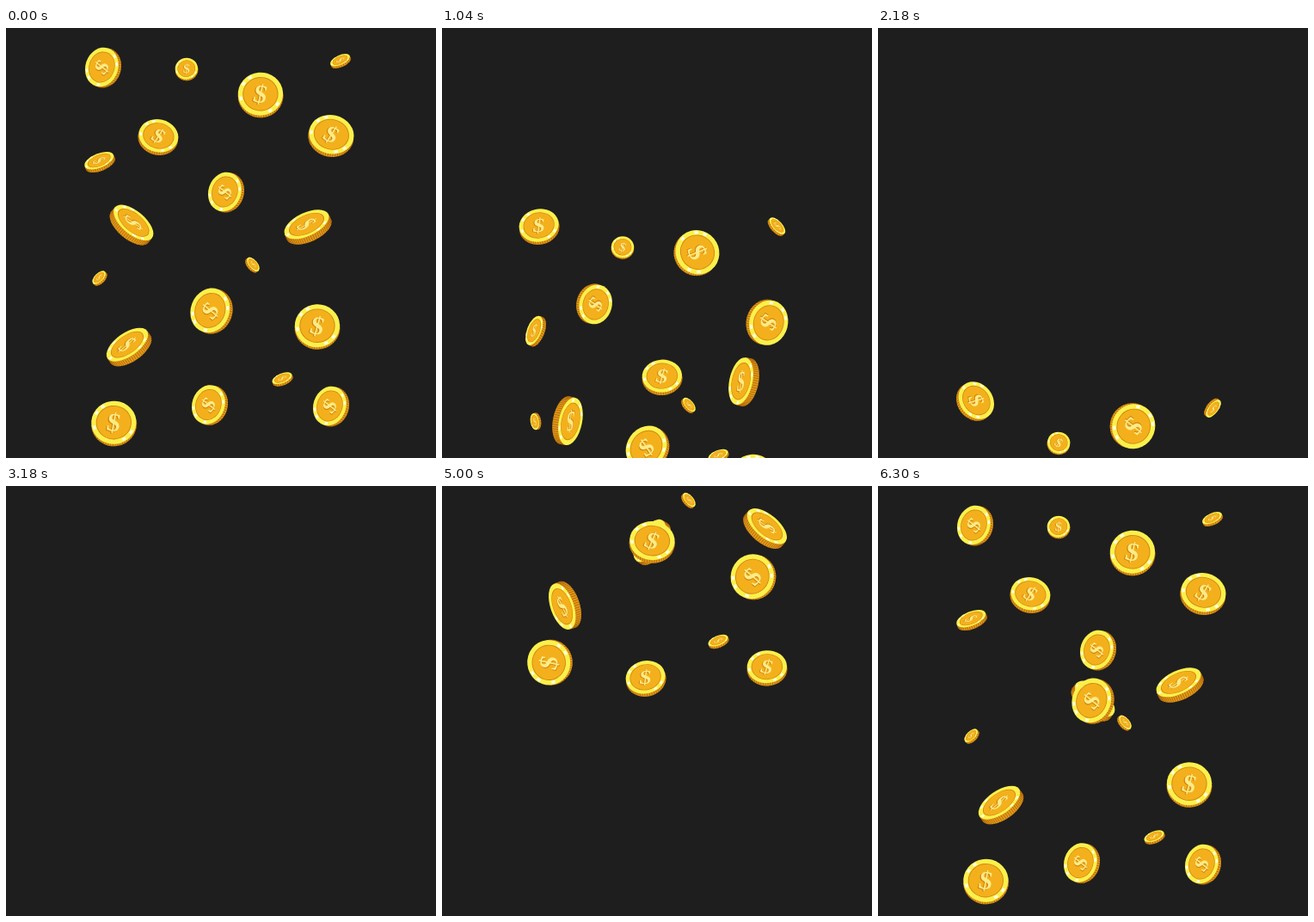
An HTML page with a canvas for the animation above (6.34 s loop, 500x500 px).

```html
<!DOCTYPE html>
<html lang="en">
<head>
<meta charset="utf-8">
<title>Falling coins</title>
<style>
  html, body { margin: 0; width: 100%; height: 100%; overflow: hidden; background: #1e1e1e; }
  canvas { display: block; width: 100vw; height: 100vh; }
</style>
</head>
<body>
<canvas id="stage" width="500" height="500"></canvas>
<script>
const ctx = document.getElementById('stage').getContext('2d');
const LOOP = 6340, HALF = 3200, END = 6300, STEP = 20;
const TAU = Math.PI * 2, RAD = Math.PI / 180;

// a, b: radii of the face; edge: visible thickness; sign: angle of the dollar sign
const KINDS = {
  full:   { a: 26.2, b: 25, edge: 2.6, sign: 17 },
  wide:   { a: 26.3, b: 22.5, edge: 3.6, sign: 17 },
  mid:    { a: 23.2, b: 19, edge: 3.4, sign: 17 },
  flat:   { a: 28, b: 13.5, edge: 7, sign: 78 },
  slim:   { a: 18, b: 8.3, edge: 4, sign: 78 },
  tiny:   { a: 13.2, b: 12.4, edge: 1.6, sign: 17 },
  chip:   { a: 12.2, b: 5.6, edge: 2.8, sign: 78 },
  crumb:  { a: 9.8, b: 4.9, edge: 2.6, sign: 78 }
};

// kind, x, y, tilt, fall and spin on the way out, fall and spin on the way in (px/s, deg/s)
const COINS = [
  ['mid', 113, 46, -72, 178, 57],
  ['tiny', 210, 48, -12, 199.5, 13],
  ['full', 296, 78, -5, 176.5, 53],
  ['chip', 389, 38.5, -25, 185, 70],
  ['mid', 177, 127, 13, 186.5, 88, 175, 60],
  ['wide', 378, 125.5, 13, 208.5, 88],
  ['slim', 109, 156, -22, 189, -45, 132.5, -45],
  ['mid', 256, 191, -72, 207, 65, 198, -57],
  ['flat', 146, 229, 40, 219, 59, 142, 75, { x: 250, y: 250, drift: 4.4 }],
  ['flat', 351, 231.5, -25, 173, -51, 140, -50, { x: 351, y: 231.5, drift: -19 }],
  ['crumb', 109, 291, -45, 160, -52, 270, 85],
  ['crumb', 286.5, 275.5, 50, 157, 0, 199, 0],
  ['wide', 239, 329, -70, 153.5, 15, 142, -57, { x: 250, y: 250, drift: 4.4 }],
  ['full', 362, 347.5, -2, 168, 38, 186, 50],
  ['flat', 143, 371, -35, 243, -45, 178.5, 57],
  ['chip', 321.5, 408.5, -22, 86, 0, 175, 0],
  ['full', 125.5, 460, -7, 180, 50, 196, 68],
  ['mid', 237, 438.5, -72, 180, 50, 165, -45],
  ['mid', 378, 440, -72, 180, 50, 175.5, -53]
];

function disc(r, color) {
  ctx.beginPath();
  ctx.arc(0, 0, r, 0, TAU);
  ctx.fillStyle = color;
  ctx.fill();
}

function drawEdge({ a, b, edge }) {
  ctx.beginPath();
  ctx.ellipse(0, edge / 2, a, b, 0, 0, Math.PI);
  ctx.lineTo(-a, -edge / 2);
  ctx.lineTo(a, -edge / 2);
  ctx.closePath();
  ctx.fillStyle = '#e39a18';
  ctx.fill();

  ctx.beginPath();
  const count = Math.round(a * 1.1);
  for (let i = 1; i < count; i++) {
    const t = Math.PI * i / count;
    const x = a * Math.cos(t), y = b * Math.sin(t);
    ctx.moveTo(x, y - edge / 2);
    ctx.lineTo(x, y + edge / 2);
  }
  ctx.strokeStyle = '#ad640c';
  ctx.lineWidth = 0.8;
  ctx.stroke();
}

function drawGlints() {
  ctx.strokeStyle = '#fffde0';
  ctx.lineWidth = 0.13;
  for (const start of [0.55, 1.05, 2.9, 3.7, 4.15]) {
    ctx.beginPath();
    ctx.arc(0, 0, 0.89, start, start + 0.2);
    ctx.stroke();
  }
}

function drawSign(angle) {
  ctx.rotate(angle * RAD);
  ctx.font = 'bold 120px "Liberation Serif", serif';
  ctx.textAlign = 'center';
  ctx.scale(0.01, 0.01);
  ctx.fillStyle = '#cf8310';
  ctx.fillText('$', -4, 43);
  ctx.fillStyle = '#fdeb86';
  ctx.fillText('$', 0, 40);
}

function drawCoin(kind, x, y, tilt) {
  ctx.save();
  ctx.translate(x, y);
  ctx.rotate(tilt * RAD);
  drawEdge(kind);
  ctx.translate(0, -kind.edge / 2);
  ctx.scale(kind.a, kind.b);
  disc(1, '#fbf04c');
  drawGlints();
  disc(0.79, '#d08613');
  disc(0.755, '#f3b01c');
  drawSign(kind.sign);
  ctx.restore();
}

function draw(ms) {
  ctx.fillStyle = '#1e1e1e';
  ctx.fillRect(0, 0, 500, 500);
  const leaving = ms < HALF;
  const s = (leaving ? ms : Math.min(ms, END) - END) / 1000;
  for (const [name, x, y, tilt, fall, spin, fallIn = fall, spinIn = spin, land] of COINS) {
    const goal = !leaving && land || { x, y, drift: 0 };
    const v = leaving ? fall : fallIn;
    const w = leaving ? spin : spinIn;
    const cy = goal.y + v * s;
    if (cy > -35 && cy < 535) drawCoin(KINDS[name], goal.x + goal.drift * s, cy, tilt + w * s);
  }
}

const began = performance.now();
function tick() {
  const ms = (performance.now() - began) % LOOP;
  draw(Math.floor(ms / STEP) * STEP);
  requestAnimationFrame(tick);
}
tick();
</script>
</body>
</html>
```
